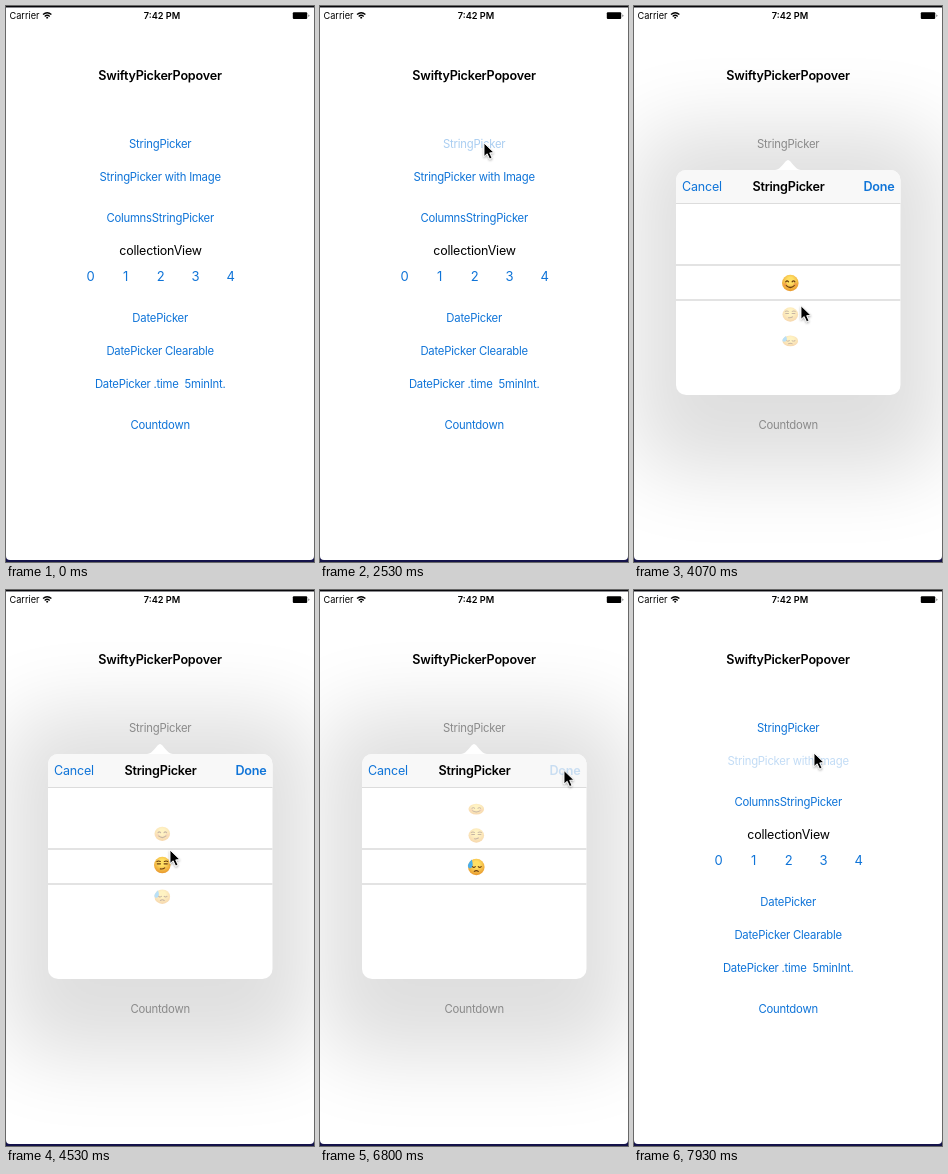
These frames come from a looping animation (308x556 px, 8 s). An HTML page:

```html
<!DOCTYPE html>
<html lang="en">
<head>
<meta charset="utf-8">
<title>SwiftyPickerPopover</title>
<style>
  html, body { margin: 0; width: 100%; height: 100%; overflow: hidden; background: #14134a; }
  svg { display: block; width: 308px; height: 556px; }
  text { font: 11.3px Inter, sans-serif; letter-spacing: -.22px; white-space: pre; text-anchor: middle; }
  .bold { font-size: 12.6px; font-weight: 600; }
  .large { font-size: 12.5px; letter-spacing: -.2px; }
  .status { font-size: 9.2px; letter-spacing: 0; }
  .blue { fill: #0f74d8; }
  .line { fill: none; stroke: #6b3d10; stroke-linecap: round; }
</style>
</head>
<body>
<svg viewBox="0 0 308 556">
  <defs>
    <filter id="blur" x="-50%" y="-50%" width="200%" height="200%"><feGaussianBlur stdDeviation="40"/></filter>
    <filter id="soft" x="-50%" y="-50%" width="200%" height="200%"><feDropShadow dx="0" dy="1.2" stdDeviation="1" flood-opacity=".35"/></filter>
    <radialGradient id="skin" cx=".5" cy=".35" r=".65">
      <stop offset=".3" stop-color="#ffdf63"/><stop offset="1" stop-color="#e8972b"/>
    </radialGradient>
    <clipPath id="band"><rect x="42" y="260" width="225" height="33"/></clipPath>
    <clipPath id="outside"><path d="M42 198H267V258H42ZM42 295H267V380H42Z"/></clipPath>
    <g id="face0">
      <circle r="8.3" fill="url(#skin)"/>
      <g fill="#f08a4a" opacity=".6"><circle cx="-5" cy="1.6" r="1.7"/><circle cx="5" cy="1.6" r="1.7"/></g>
      <path class="line" stroke-width="1.2" d="M-4.6-1.2q1.4-2 2.8 0M1.8-1.2q1.4-2 2.8 0M-4 2.6q4 3.8 8 0"/>
    </g>
    <g id="face1">
      <circle r="8.3" fill="url(#skin)"/>
      <path class="line" stroke-width="1.1" d="M-5.4-3.6q1.800-1 3.400 0M2-3.600q1.800-1 3.400 0M-5-1.200h3.200M1.800-1.200h3.200M-2 3.800q2.800.4 4.400-1"/>
    </g>
    <g id="face2">
      <circle r="8.3" fill="url(#skin)"/>
      <path fill="#49aeea" d="M-4.600-7.400q-6.400 6.800-2.200 8.800 5-.6 2.200-8.800Z"/>
      <path class="line" stroke-width="1.2" d="M-3.800-.4q1.300 1.500 2.800 0M2-.4q1.400 1.500 2.900 0M-2 4.400q2-1.600 4 0"/>
    </g>
  </defs>

  <path fill="#fff" d="M0 1H308V550q0 4-4 4H4q-4 0-4-4Z"/>
  <rect id="shadow" y="122" width="308" height="345" rx="40" filter="url(#blur)"/>
  <rect width="308" height="1" fill="#08080c"/>
  <rect y="1" width="308" height="1" fill="#8a8a8e"/>
  <rect y="554" width="308" height="2" fill="#14134a"/>

  <text class="status" x="18.5" y="13">Carrier</text>
  <g fill="none" stroke="#000" stroke-width="1.3">
    <path d="M37 8.600q4.200-3.800 8.400 0M38.700 10.400q2.500-2.200 5 0"/><path d="M41.200 10.900v1.600" stroke-width="1.800"/>
  </g>
  <text class="status" x="156" y="13" style="font-weight:600">7:42 PM</text>
  <rect x="286.800" y="6.200" width="14.400" height="6.800" rx="1"/>
  <path d="M302.600 8.200q1.600 1.400 0 2.800Z"/>

  <text class="bold" x="154" y="74">SwiftyPickerPopover</text>
  <text class="large" x="154.500" y="249">collectionView</text>
  <g id="buttons"></g>

  <g id="popover">
    <path fill="#fff" d="M141 164C147 164 151 154 154 154S161 164 167 164Z"/>
    <rect x="42" y="164" width="224.500" height="225" rx="10" fill="#fff"/>
    <path fill="#f8f8f8" d="M42 197V174a10 10 0 0 1 10-10H256.500a10 10 0 0 1 10 10V197Z"/>
    <path stroke="#dcdcdc" d="M42 197.500H266.500"/>
    <path stroke="#e3e3e3" stroke-width="2" d="M42 259H266.500M42 294H266.500"/>
    <text class="large blue" x="68" y="185.300">Cancel</text>
    <text class="bold" x="154.500" y="185.300">StringPicker</text>
    <text id="done" class="bold blue" x="245" y="185.300">Done</text>
    <g id="dim" clip-path="url(#outside)" opacity=".38"></g>
    <g id="lit" clip-path="url(#band)"></g>
  </g>

  <path id="cursor" filter="url(#soft)" stroke="#fff" stroke-width=".9" d="M0 0V13.500L3.200 10.800 5.600 16 8 15 5.700 9.900 9.800 9.500Z"/>
</svg>
<script>
const LOOP = 8000;
const $ = id => document.getElementById(id);

const labels = [
  ['StringPicker', 142], ['StringPicker with Image', 175], ['ColumnsStringPicker', 215.5],
  ['DatePicker', 316], ['DatePicker Clearable', 349], ['DatePicker .time  5minInt.', 382], ['Countdown', 422.5]
];
const digits = [0, 1, 2, 3, 4].map(n =>
  `<text class="large" style="font-size:13px" x="${84.5 + 35 * n}" y="274.7">${n}</text>`);
$('buttons').innerHTML =
  labels.map(([name, y]) => `<text x="154.2" y="${y}">${name}</text>`).join('') + digits.join('');
const [stringButton, imageButton] = $('buttons').children;

const faces = ['dim', 'lit'].map(id => {
  $(id).innerHTML = [0, 1, 2].map(i => `<use href="#face${i}"/>`).join('');
  return [...$(id).children];
});

// Each key is [time, ...values]; values ease between neighbouring keys.
const cursorKeys = [
  [1470, 311, 116], [2200, 164, 137], [2930, 164, 137], [3330, 290, 177], [3420, 290, 177],
  [3780, 168, 298], [4050, 167, 300], [4520, 164, 260], [4720, 164, 260],
  [5120, 166, 288], [5600, 163, 251.5], [6000, 163, 251.5], [6650, 244, 180.5],
  [7150, 244, 180.5], [7650, 180, 163]
];
const wheelKeys = [[4080, 0], [4500, 1.06], [4570, 1.06], [4700, 1], [5200, 1], [5670, 1.97], [5800, 2]];
const popoverKeys = [[2560, 0], [2720, 1], [6890, 1], [7130, 0]];
const stringKeys = [[2310, 1], [2340, .25], [2470, .25], [2640, .6], [2730, 1]];
const doneKeys = [[6720, 1], [6770, .2]];
const imageKeys = [[7700, 1], [7800, .25]];

function at(keys, t) {
  const next = keys.findIndex(k => k[0] > t);
  if (next < 1) return (next ? keys[keys.length - 1] : keys[0]).slice(1);
  const [t0, ...a] = keys[next - 1], [t1, ...b] = keys[next];
  const u = (t - t0) / (t1 - t0), e = u * u * (3 - 2 * u);
  return a.map((v, i) => v + (b[i] - v) * e);
}

const mix = (a, b, u) => `rgb(${a.map((v, i) => Math.round(v + (b[i] - v) * u))})`;

function turnWheel(position) {
  const step = 23 * Math.PI / 180;
  faces.forEach((row, lit) => row.forEach((face, i) => {
    const angle = (i - position) * step, size = lit ? 1 : .94;
    const y = 277 + 80.5 * Math.sin(angle);
    face.setAttribute('transform', `translate(156.3 ${y}) scale(${size} ${size * Math.cos(angle)})`);
  }));
}

function draw(now) {
  const t = now % LOOP;
  const [x, y] = at(cursorKeys, t), [shown] = at(popoverKeys, t);
  $('cursor').setAttribute('transform', `translate(${x} ${y})`);
  $('cursor').style.display = t < 1470 ? 'none' : '';
  $('popover').setAttribute('opacity', shown);
  $('shadow').setAttribute('opacity', .125 * shown);
  $('buttons').setAttribute('fill', mix([15, 116, 216], [138, 138, 138], shown));
  stringButton.setAttribute('opacity', at(stringKeys, t));
  imageButton.setAttribute('opacity', at(imageKeys, t));
  $('done').setAttribute('opacity', at(doneKeys, t));
  turnWheel(at(wheelKeys, t)[0]);
  requestAnimationFrame(() => draw(performance.now()));
}
draw(performance.now());
</script>
</body>
</html>
```
